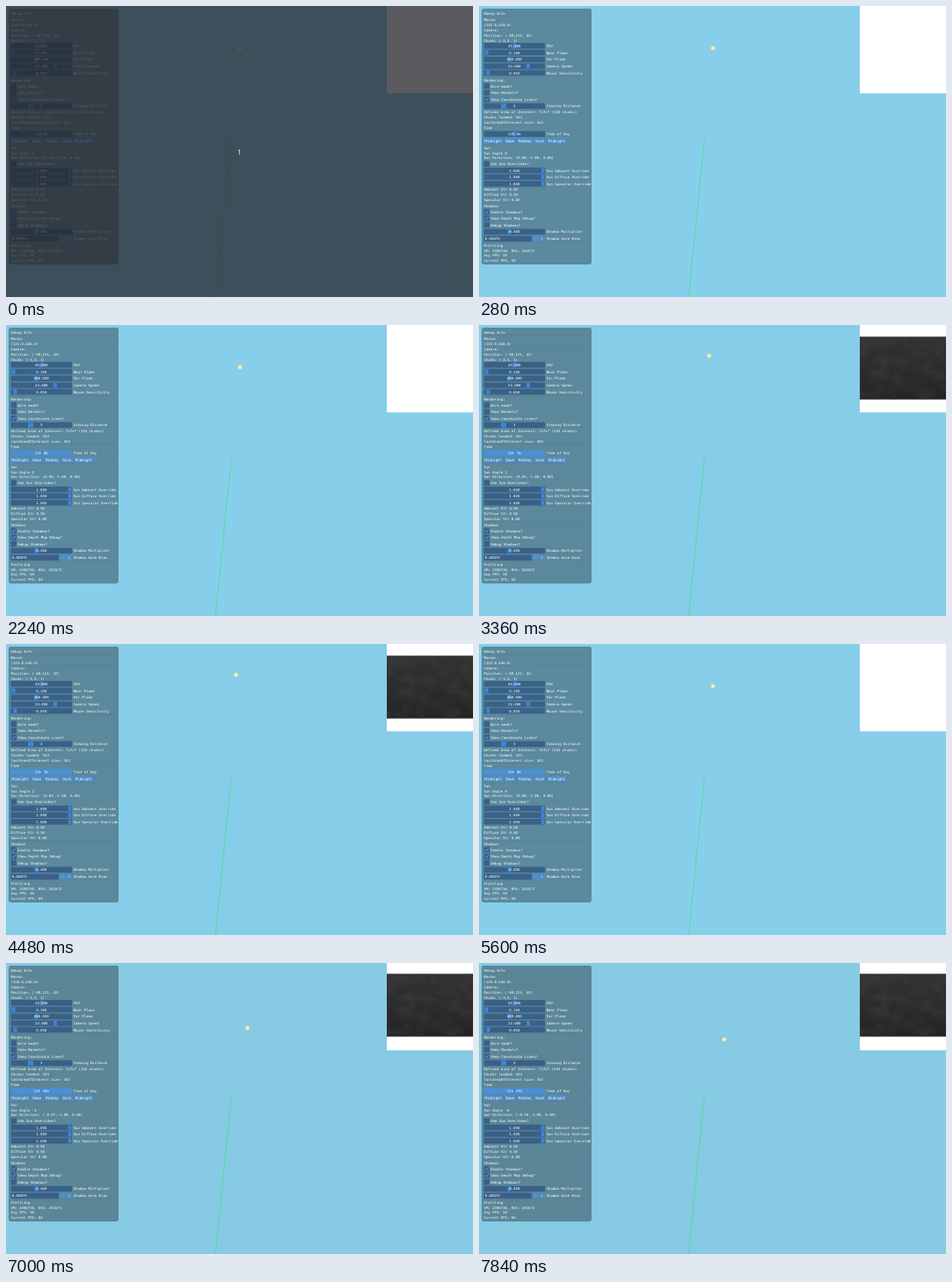
These frames come from a looping animation (531x331 px, 8 s). An HTML page:

```html
<!DOCTYPE html>
<html lang="en">
<head>
<meta charset="utf-8">
<title>Debug panel</title>
<style>
  html, body { margin: 0; width: 100%; height: 100%; overflow: hidden; background: #87ceeb; }
  svg { display: block; width: 531px; height: 331px; }
  text { font: 4px "DejaVu Sans Mono", "Liberation Mono", monospace; fill: #fff; white-space: pre; text-rendering: geometricPrecision; }
  .mid { text-anchor: middle; }
  .frame { fill: rgba(35, 72, 124, .6); }
  .grab { fill: #3d85e0; }
  .button { fill: rgba(66, 150, 250, .45); }
  .tick { fill: none; stroke: #52a4ff; stroke-width: 1; }
  .rule { stroke: rgba(90, 100, 130, .5); stroke-width: .4; }
  #count { font: 8px "Open Sans", Arial, sans-serif; text-anchor: middle; }
  #intro { animation: intro 8s step-end infinite; }
  @keyframes intro { 0% { visibility: visible; } 3.5% { visibility: hidden; } }
</style>
</head>
<body>
<svg viewBox="0 0 531 331">
  <defs>
    <filter id="grain" x="0" y="0" width="1" height="1" color-interpolation-filters="sRGB">
      <feTurbulence type="fractalNoise" baseFrequency=".06 .08" numOctaves="3" seed="5"/>
      <feColorMatrix values="0 0 0 0 .28  0 0 0 0 .27  0 0 0 0 .27  .8 0 0 0 -.3"/>
    </filter>
    <linearGradient id="depth" x2="0" y2="1">
      <stop offset="0" stop-color="#333232"/>
      <stop offset=".5" stop-color="#2d2c2c"/>
      <stop offset="1" stop-color="#252424"/>
    </linearGradient>
  </defs>
  <rect id="sky" width="531" height="331"/>
  <path d="M256.4 150.5L255.6 158L238.3 331" fill="none" stroke="#45df7c" stroke-width=".75"/>
  <g id="sun">
    <circle r="2.6" fill="#f7d98c" opacity=".8"/>
    <circle r="1.8" fill="#fff0b4"/>
  </g>
  <rect x="433" width="98" height="99.3" fill="#fff"/>
  <g id="map">
    <rect x="433" y="13.3" width="98" height="71.4" fill="url(#depth)"/>
    <rect x="433" y="13.3" width="98" height="71.4" filter="url(#grain)"/>
  </g>
  <g id="panel">
    <rect x="3" y="3" width="125" height="291" rx="2.4" fill="rgba(15,15,18,.36)"/>
  </g>
  <g id="intro">
    <rect width="531" height="331" fill="rgba(37,36,42,.75)"/>
    <text id="count" x="265.3" y="168.6">1</text>
  </g>
</svg>
<script>
const panel = document.getElementById('panel');
const byId = id => document.getElementById(id);

function add(tag, attrs, text) {
  const el = document.createElementNS('http://www.w3.org/2000/svg', tag);
  for (const k in attrs) el.setAttribute(k, attrs[k]);
  if (text) el.textContent = text;
  return panel.appendChild(el);
}
const label = (x, y, text, cls = '') => add('text', { x, y: y + 1.5, class: cls }, text);
const box = (x, y, width, cls) =>
  add('rect', { x, y: y - 3.25, width, height: 6.5, class: cls });
const rule = y => add('line', { x1: 5.5, x2: 126, y1: y, y2: y, class: 'rule' });

function slider(y, value, name, grab, size = 4) {
  const bar = box(5.5, y, 69.5, 'frame');
  const knob = add('rect', { x: grab - size / 2, y: y - 2.6, width: size, height: 5.2, class: 'grab' });
  const text = label(40.3, y, value, 'mid');
  label(76.7, y, name);
  return { bar, knob, text };
}
function check(y, name, on) {
  box(5.5, y, 6.5, 'frame');
  if (on) add('path', { d: `M7 ${y}l1.4 1.6l2.5 -3.2`, class: 'tick' });
  label(13.3, y, name);
}
function button(x, y, width, name) {
  box(x, y, width, 'button');
  label(x + width / 2, y, name, 'mid');
}
const lines = rows => rows.map(([y, text]) => label(5.5, y, text));

const mouse = lines([[21, ''], [8, 'Debug Info'], [15, 'Mouse:'], [27.5, 'Camera:'],
  [33.5, 'Position: (-69,121, 42)'], [39.2, 'Chunk: (-3,3, 1)']])[0];
slider(45.3, '45.000', 'FOV', 40.5);
slider(53, '0.100', 'Near Plane', 8.5);
slider(60.8, '400.000', 'Far Plane', 34.5);
slider(68.5, '24.000', 'Camera Speed', 56);
slider(76, '0.050', 'Mouse Sensitivity', 10.5);

label(5.5, 84, 'Rendering:');
check(91, 'Wire mode?');
check(98.6, 'Show Normals?');
check(106.2, 'Show Coordinate Lines?', true);
slider(113.8, '3', 'Viewing Distance', 28, 6);
lines([[120.7, 'Defined Area of Interest: 7x7x7 (343 chunks)'],
  [126.4, 'Chunks loaded: 343'], [132, 'lastAreaOfInterest size: 343'], [138.8, 'Time']]);

const clock = slider(145.6, '', 'Time of Day', 40.3);
[[5.5, 21.5, 'Midnight'], [29.2, 12.3, 'Dawn'], [43.5, 17.5, 'Midday'],
  [63.2, 12.3, 'Dusk'], [77.7, 21.5, 'Midnight']].forEach(([x, w, name]) => button(x, 153.3, w, name));

const [angle, direction] = lines([[167, ''], [172.7, ''], [161.2, 'Sun']]);
check(179.6, 'Use Sun Overrides?');
['Ambient', 'Diffuse', 'Specular'].forEach((kind, i) => {
  slider(187 + 7.6 * i, '1.000', `Sun ${kind} Override`, 72.5, 3.5);
  label(5.5, 208.9 + 5.7 * i, `${kind} Str ${i < 2 ? '0.50' : '0.80'}`);
});

label(5.5, 227.2, 'Shadows');
check(234, 'Enable Shadows?', true);
check(241.5, 'Show Depth Map Debug?', true);
check(249, 'Debug Shadows?');
slider(256.8, '0.400', 'Shadow Multiplier', 34.5);
box(5.5, 264.6, 54.5, 'frame');
label(6.8, 264.6, '0.00070');
button(61.2, 264.6, 6.4, '-');
button(68.6, 264.6, 6.4, '+');
label(76.7, 264.6, 'Shadow Acne Bias');
const fps = lines([[289.3, ''], [272, 'Profiling'], [278, 'VM: 2398736, RSS: 201572'],
  [283.6, 'Avg FPS: 59']])[0];
[11.7, 24.2, 80.4, 135.4, 157.5, 223.8, 268.6].forEach(rule);

// Start time, slider steps from noon, mouse position, bar opacity
const states = [
  [0, 0, '132.0,420.0', 0],
  [1400, 0, '123.0,446.0', .5],
  [2800, 1, '123.0,446.0', .62],
  [5320, 0, '122.0,446.0', .62],
  [6440, -1, '121.0,446.0', .62],
  [7000, -2, '120.0,446.0', .62],
  [7560, -3, '119.0,446.0', .62]
];

function show([, step, pos, glow]) {
  const minutes = Math.floor(720 + step * 7.4);
  const degrees = (minutes - 720) / 4;
  const x = Math.sin(degrees * Math.PI / 180);
  mouse.textContent = `(${pos})`;
  clock.text.textContent = `${Math.floor(minutes / 60)}h ${minutes % 60}m`;
  clock.knob.setAttribute('x', 38.3 + step * .35);
  clock.bar.style.fill = glow ? `rgba(66,150,250,${glow})` : '';
  angle.textContent = `Sun Angle ${Math.round(degrees)}`;
  direction.textContent = `Sun Direction: (${x.toFixed(2)},-1.00, 0.00)`;
  fps.textContent = `Current FPS: ${step < 0 ? 60 : 59}`;
  byId('sun').setAttribute('transform', `translate(${266 - 4.3 * step} ${48 - 13 * step})`);
  byId('map').setAttribute('visibility', step ? 'visible' : 'hidden');
  byId('map').setAttribute('transform', `translate(0 ${step < 0 ? -1 : 0})`);
  byId('sky').setAttribute('fill', step > 0 ? '#86cde9' : step < 0 ? '#86cae4' : '#87ceeb');
}

let current;
function tick() {
  const now = document.timeline.currentTime ?? performance.now();
  const t = now % 8000;
  const next = states.filter(s => s[0] <= t).pop();
  if (next !== current) show(current = next);
  requestAnimationFrame(tick);
}
show(current = states[0]);
requestAnimationFrame(tick);
document.getAnimations().forEach(a => { a.startTime = 0; });
</script>
</body>
</html>
```
